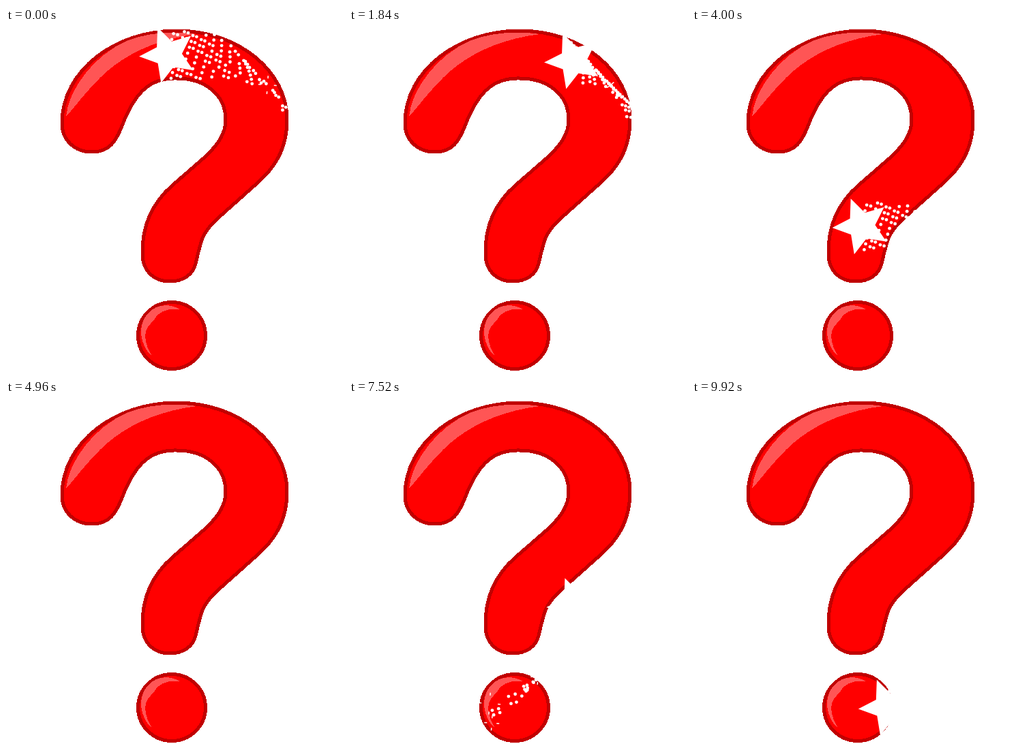
Recreate the animation shown at these times as an HTML page with a canvas. Size 494 by 505 pixels, loop 10000 ms.

```html
<!DOCTYPE html>
<html lang="en">
<head>
<meta charset="utf-8">
<title>Question mark with a circling star</title>
<style>
  html, body { margin: 0; width: 100%; height: 100%; overflow: hidden; background: #fff; }
  svg, canvas { position: absolute; left: 0; top: 0; width: 494px; height: 505px; }
  .body { fill: #f00; stroke: #c00000; stroke-width: 5; }
  .shine { fill: #f55; }
</style>
</head>
<body>
<svg viewBox="0 0 494 505" shape-rendering="crispEdges">
  <path class="body" d="M82 140C82 62 160 4 250 4C342 4 412 64 412 134C412 178 394 205 368 228L312 278C287 301 287 308 278 346C274 362 260 372 240 372C216 372 200 356 200 332C199 286 217 254 245 230L292 189C312 170 322 154 322 135C322 98 292 74 250 74C212 73 191 94 174 134C164 160 156 182 126 182C100 182 82 164 82 140Z"/>
  <path class="shine" d="M88 130C91 91 129 39 179 18C214 5 250 5 280 9C230 15 190 32 160 54C130 76 106 110 88 130Z"/>
  <ellipse class="body" cx="243" cy="451.5" rx="49.5" ry="49"/>
  <path class="shine" d="M214 482C196 466 192 436 208 419C220 405 240 404 255 413C238 411 222 416 216 430C212 434 204 440 204 452C204 464 210 474 214 482Z"/>
</svg>
<canvas width="494" height="505"></canvas>
<script>
const ctx = document.querySelector('canvas').getContext('2d');
const STEP = 80, LAP = 25;

// Where the star's orbit is placed on each successive lap
const places = [[0, 0], [105, 156], [10.5, 251.5], [-110, 82.5], [3, 410.5]];

// Key points of the orbit, evenly spaced in time, anticlockwise from the top
const keys = [
  [240, 39], [130, 45], [45, 110], [20, 220], [75, 330],
  [203, 411], [318, 375], [418, 290], [442, 170], [352, 58]
];

const mod = (v, n) => ((v % n) + n) % n;

// Smooth closed curve through the key points; k counts steps
function orbit(k) {
  const n = keys.length, u = mod(k, LAP) / LAP * n;
  const i = Math.floor(u), t = u - i;
  const [a, b, c, d] = [-1, 0, 1, 2].map(j => keys[mod(i + j, n)]);
  return [0, 1].map(m => b[m] + t / 2 * (c[m] - a[m]
    + t * (2 * a[m] - 5 * b[m] + 4 * c[m] - d[m]
    + t * (3 * (b[m] - c[m]) + d[m] - a[m]))));
}

// Point beside the orbit, a positive offset lying outside it
function beside(k, offset) {
  const [x, y] = orbit(k);
  const [x0, y0] = orbit(k - .1), [x1, y1] = orbit(k + .1);
  const len = Math.hypot(x1 - x0, y1 - y0);
  return [x - (y0 - y1) / len * offset, y - (x0 - x1) / len * offset];
}

function seeded(seed) {
  return () => (seed = seed * 16807 % 2147483647) / 2147483647;
}
const random = seeded(2024);

// Dust spread evenly along the orbit; each grain lasts some steps
const dust = Array.from({ length: 1000 }, (_, i) => {
  const k = LAP * mod(i * .754878, 1);
  const offset = 70 * (mod(i * .56984, 1) - .5);
  const life = 1 + 6 * random() ** 1.2 * (1 - Math.abs(offset) / 50);
  const [x, y] = beside(k, offset);
  return { x, y, k, life };
});

// One sparkle per step of the lap, lit some steps after the star has passed
const sparkles = Array.from({ length: LAP }, (_, i) => {
  const [x, y] = beside(i + random(), 70 * (random() - .5));
  return { x, y, born: i + 1 + Math.floor(6 * random() ** 2) };
});

// A small cross that breaks into four ticks drifting apart
function drawSparkle(x, y, age) {
  const whole = age < 2;
  const from = whole ? 0 : 2 + 2.5 * age;
  const to = whole ? 6.5 : from + 4;
  ctx.beginPath();
  for (let i = 0; i < 4; i++) {
    const a = (whole ? .9 : .07) + i * Math.PI / 2;
    const c = Math.cos(a), s = Math.sin(a);
    ctx.moveTo(x + from * c, y + from * s);
    ctx.lineTo(x + to * c, y + to * s);
  }
  ctx.stroke();
}

function drawStar(x, y) {
  ctx.beginPath();
  for (let i = 0; i < 10; i++) {
    const r = i % 2 ? 20 : 43, a = Math.PI * (.98 + i / 5);
    ctx.lineTo(x + r * Math.cos(a), y + r * Math.sin(a));
  }
  ctx.fill();
}

function draw(step) {
  const k = step % LAP;
  const [dx, dy] = places[Math.floor(step / LAP) % places.length];
  const [sx, sy] = orbit(k);

  ctx.clearRect(0, 0, 494, 505);
  ctx.save();
  ctx.translate(dx, dy);
  ctx.fillStyle = ctx.strokeStyle = '#fff';
  ctx.lineWidth = 1.5;

  for (const d of dust) {
    if (mod(k - d.k, LAP) > d.life) continue;
    ctx.beginPath();
    ctx.arc(d.x, d.y, 2.4, 0, 7);
    ctx.fill();
  }
  for (const s of sparkles) {
    const age = mod(k - s.born, LAP);
    if (age < 5) drawSparkle(s.x, s.y, age);
  }
  drawStar(sx - 2, sy);
  ctx.restore();
}

const start = performance.now();
let shown = -1;
function tick() {
  const elapsed = Math.max(0, performance.now() - start) % 10000;
  const step = Math.floor(elapsed / STEP);
  if (step !== shown) draw(shown = step);
  requestAnimationFrame(tick);
}
tick();
</script>
</body>
</html>
```
